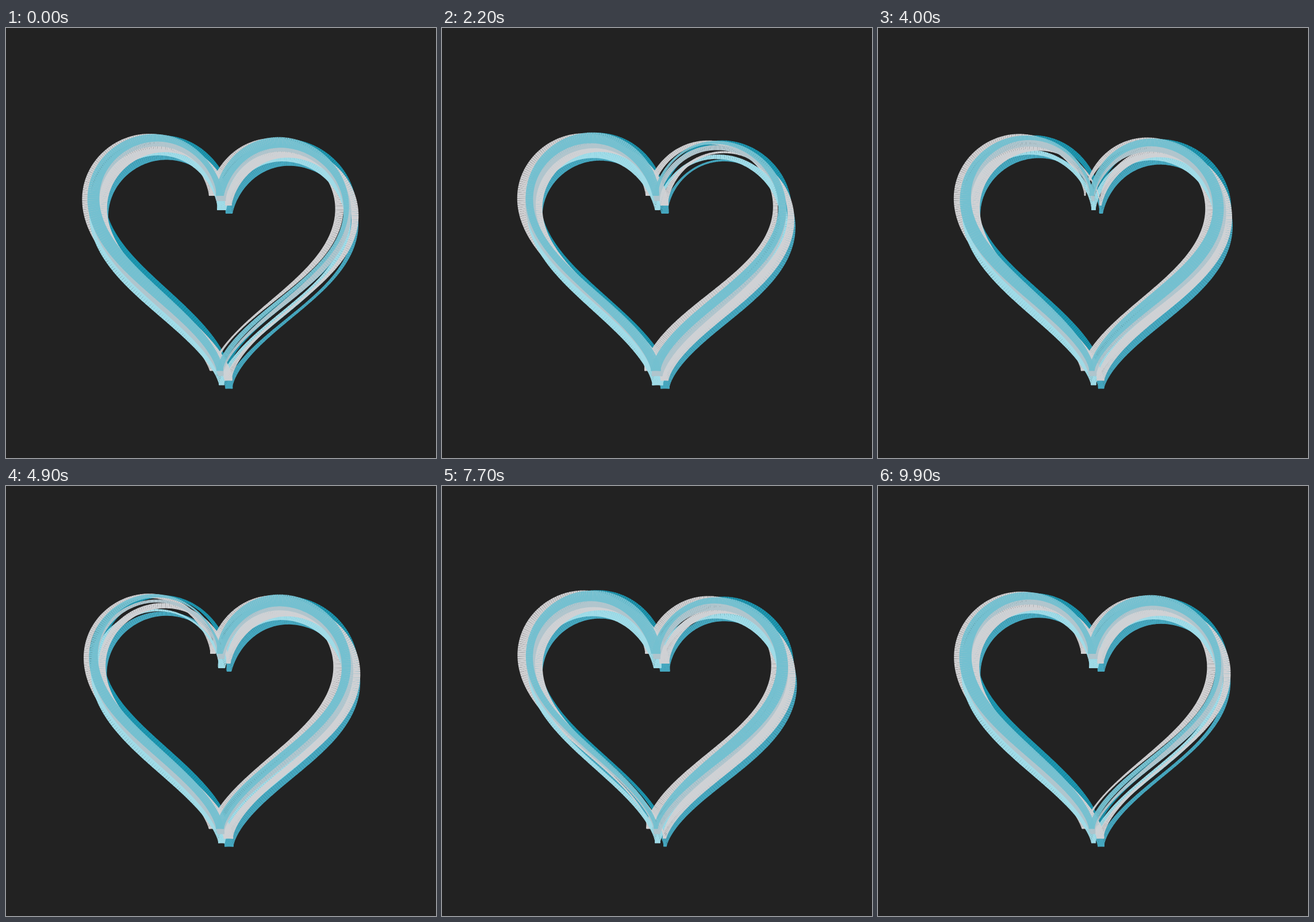
Animation, 748 px wide and 748 px high, one loop 10 s. Source, as an HTML page with a canvas:

```html
<!DOCTYPE html>
<html lang="en">
<head>
<meta charset="utf-8">
<title>Ribbon heart</title>
<style>
html, body { margin: 0; width: 100%; height: 100%; overflow: hidden; background: #222; }
canvas { display: block; width: 748px; height: 748px; }
</style>
</head>
<body>
<canvas id="stage" width="748" height="748"></canvas>
<script>
const ctx = document.getElementById('stage').getContext('2d');
const { sin, cos, hypot, max, floor, PI } = Math;
const LOOP = 10000, FRAME = 100, TAU = PI * 2, STEPS = 460;
const SCALE_X = 13.75, SCALE_Y = 13.85, SKEW = 0.037;

// Notch position and colour, back to front
const hearts = [
  { x: 383, y: 292, color: '#1c96b0' },
  { x: 388, y: 322, color: '#46a8c0' },
  { x: 360, y: 291, color: '#d0d0d2' },
  { x: 375, y: 316, color: '#a0dce8' },
  { x: 387, y: 308, color: '#d0d1d4' },
  { x: 374, y: 300, color: '#b0c5cd' },
  { x: 372, y: 291, color: '#74c0d0' }
];

// Heart curve measured from the notch; the right lobe hangs slightly lower
function point(a) {
  const x = 16 * sin(a) ** 3 * SCALE_X;
  const y = 5 - 13 * cos(a) + 5 * cos(2 * a) + 2 * cos(3 * a) + cos(4 * a);
  return { x, y: y * SCALE_Y + x * SKEW };
}

const path = Array.from({ length: STEPS }, (_, i) => {
  const a = (i + 0.5) / STEPS * TAU, d = 0.001;
  const p = point(a), p0 = point(a - d), p1 = point(a + d);
  const dx = p1.x - p0.x, dy = p1.y - p0.y, len = hypot(dx, dy);
  const gap = len / (2 * d) * TAU / STEPS;
  return { a, ...p, nx: -dy / len, ny: dx / len, thick: max(1, gap + 0.1) };
});

// Two waves run around all ribbons, a third sets each one apart
function ribbonWidth(a, turn, seed) {
  return 13.5 - 1.5 * cos(2 * a)
    + 4.2 * sin(2 * turn + 2 * a)
    + 3.5 * cos(turn + a + PI / 3)
    + 2.8 * cos(2 * turn - 3 * a + seed * 2.4);
}

function drawHeart(heart, turn, seed) {
  ctx.strokeStyle = heart.color;
  for (const p of path) {
    const half = max(2, ribbonWidth(p.a, turn, seed)) / 2;
    const x = heart.x + p.x, y = heart.y + p.y;
    ctx.lineWidth = p.thick;
    ctx.beginPath();
    ctx.moveTo(x - p.nx * half, y - p.ny * half);
    ctx.lineTo(x + p.nx * half, y + p.ny * half);
    ctx.stroke();
  }
}

function draw(now) {
  const time = floor(now % LOOP / FRAME) * FRAME;
  const turn = time / LOOP * TAU;
  ctx.fillStyle = '#222';
  ctx.fillRect(0, 0, 748, 748);
  hearts.forEach((heart, i) => drawHeart(heart, turn, i));
}

const start = performance.now();
function tick() {
  draw(performance.now() - start);
  requestAnimationFrame(tick);
}
tick();
</script>
</body>
</html>
```
